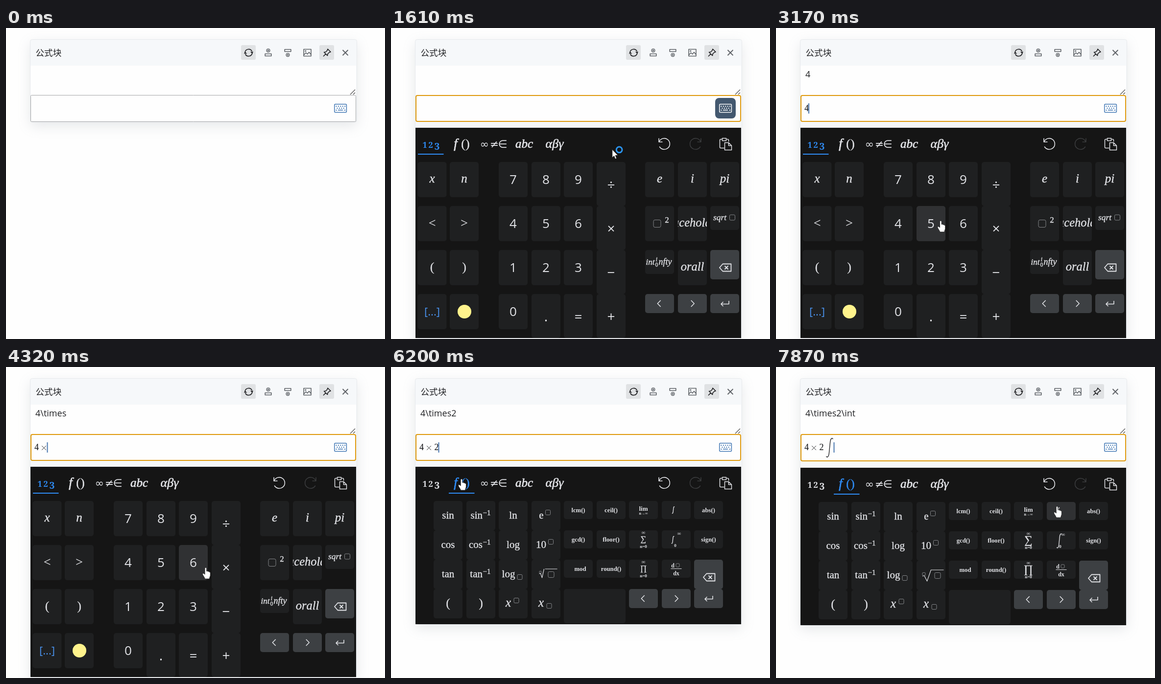
Recreate the animation shown at these times as an HTML page with a canvas. Size 774x636 px, loop 8000 ms.

```html
<!DOCTYPE html>
<html lang="zh">
<head>
<meta charset="utf-8">
<title>公式块</title>
<style>
  html, body { margin: 0; width: 100%; height: 100%; overflow: hidden; background: #fefefe; }
  canvas { display: block; }
</style>
</head>
<body>
<canvas id="stage" width="774" height="636"></canvas>
<script>
const ctx = document.getElementById('stage').getContext('2d');
const LOOP = 8000;
const PAGE = '#fefefe', PANEL = '#f6f8fa', DARK = '#151515', KEY = '#1f2021', HOVER = '#303133', ACTION = '#3d4043';
const LIGHT = '#e3e4e8', BLUE = '#2f8cf5', INK = '#202124', GREY = '#5f6368';
const SANS = '"Open Sans", "Noto Sans", sans-serif';
const SERIF = '"Liberation Serif", serif';

// ---------- timeline ----------
const EDITS = [1080, 2960, 3990, 5130, 7680];
const SOURCES = ['', '4', '4\\times', '4\\times2', '4\\times2\\int'];
const CARET_X = [57, 66, 83.5, 96.5, 117.5];
const KEYBOARD_OPEN = 1470, FUNCTIONS_OPEN = 6130, LARGE_SYMBOLS = 6320;
const HOVERS = [
  [2500, 3040, '4'], [3080, 3300, '5'], [3300, 3460, '6'], [3920, 4200, '×'],
  [4200, 4440, '6'], [4730, 5200, '2'], [7680, 8000, '∫']
];
// time, x, y, pointing hand
const POINTER = [
  [190, 772, 634, 0], [560, 738, 390, 0], [870, 686, 172, 1], [940, 682, 162, 1], [1400, 682, 162, 0],
  [1610, 453, 248, 0], [1810, 207, 331, 0], [2020, 207, 331, 0], [2150, 204, 326, 0], [2290, 204, 326, 0],
  [2430, 299, 353, 0], [2560, 276, 376, 1], [2700, 262, 395, 1], [2960, 262, 395, 1], [3170, 336, 394, 1],
  [3400, 410, 440, 1], [3650, 448, 479, 1], [3780, 429, 403, 1], [4130, 429, 403, 1], [4320, 408, 410, 1],
  [4660, 348, 487, 1], [4990, 325, 487, 1], [5130, 325, 487, 0], [5250, 506, 443, 0], [5390, 556, 400, 0],
  [5630, 335, 305, 0], [5870, 121, 224, 0], [5990, 113, 221, 0], [6130, 144, 229, 1], [6530, 144, 229, 0],
  [6800, 330, 262, 0], [7140, 569, 290, 0], [7280, 557, 288, 0], [7410, 557, 288, 0], [7470, 574, 285, 1],
  [8000, 574, 285, 1]
];

// Zero speed where the pointer rests, otherwise the mean speed of the neighbours.
function speed(i, axis) {
  const a = POINTER[i - 1], b = POINTER[i], c = POINTER[i + 1];
  const still = (p, q) => p[1] === q[1] && p[2] === q[2];
  if (!a || !c || still(a, b) || still(b, c)) return 0;
  return (c[axis] - a[axis]) / (c[0] - a[0]);
}

function pointerAt(t) {
  const i = POINTER.findLastIndex(p => p[0] <= t);
  if (i < 0) return null;
  const a = POINTER[i], b = POINTER[i + 1], span = b[0] - a[0], u = (t - a[0]) / span;
  const along = axis =>
    a[axis] * (1 + 2 * u) * (1 - u) ** 2 + b[axis] * u * u * (3 - 2 * u) +
    span * (speed(i, axis) * u * (1 - u) ** 2 - speed(i + 1, axis) * u * u * (1 - u));
  return { x: along(1), y: along(2), hand: a[3] };
}

// ---------- drawing helpers ----------
function text(s, x, y, font, color = LIGHT, align = 'center', weight = 0) {
  ctx.font = font;
  ctx.textAlign = align;
  ctx.fillStyle = ctx.strokeStyle = color;
  ctx.fillText(s, x, y);
  if (weight) { ctx.lineWidth = weight; ctx.strokeText(s, x, y); }
}
const serif = (s, x, y, size, { style = '', color = LIGHT, align = 'center', weight = 0.35 } = {}) =>
  text(s, x, y, `${style} ${size}px ${SERIF}`, color, align, weight);
const italic = (s, x, y, size, options) => serif(s, x, y, size, { style: 'italic', ...options });
const bold = (s, x, y, size) => serif(s, x, y, size, { style: 'bold', weight: 0 });

function rounded(x, y, w, h, r, fill, stroke, width = 1) {
  ctx.beginPath();
  ctx.roundRect(x, y, w, h, r);
  if (fill) { ctx.fillStyle = fill; ctx.fill(); }
  if (stroke) { ctx.strokeStyle = stroke; ctx.lineWidth = width; ctx.stroke(); }
}

function icon(d, x, y, { stroke = LIGHT, fill, width = 1.6, scale = 1, flip = 1 } = {}) {
  const path = new Path2D(d);
  ctx.save();
  ctx.translate(x, y);
  ctx.scale(scale * flip, scale);
  ctx.lineWidth = width / scale;
  ctx.lineJoin = 'round';
  if (fill) { ctx.fillStyle = fill; ctx.fill(path); }
  if (stroke) { ctx.strokeStyle = stroke; ctx.stroke(path); }
  ctx.restore();
}

function disc(x, y, r, color) {
  ctx.beginPath();
  ctx.arc(x, y, r, 0, 7);
  ctx.fillStyle = color;
  ctx.fill();
}

const slot = (x, y, size = 10) => rounded(x + 0.5, y + 0.5, size, size, size / 5, null, '#85878a', 1);
const integral = (x, y, height, color = LIGHT) =>
  icon('M6.8-17.5C5.5-20.5 2.5-20 1.2-12L-1.2 12C-2.5 20-5.5 20.5-6.8 17.5', x, y,
    { stroke: color, width: 1.4, scale: height / 40 });

// ---------- key labels ----------
const digit = (s, x, y) => text(s, x, y + 9.4, `26px ${SANS}`);
const operator = (s, x, y) => text(s, x, y + 10.5, `28px ${SANS}`);
const variable = (s, x, y) => italic(s, x, y + 5.5, 25);
const symbol = (s, x, y) => serif(s, x, y + 7, 26, { weight: 0.2 });
const named = (s, x, y) => serif(s, x, y + 6, 21);
const small = (s, x, y) => bold(s, s === 'mod' ? x + 4 : x, y + 4, 12.7);
const left = (s, x, y) => icon('M3.2-6.5L-3.2 0L3.2 6.5', x - 1, y);
const right = (s, x, y) => icon('M-3.2-6.5L3.2 0L-3.2 6.5', x + 0.5, y);
const enter = (s, x, y) => icon('M8.5-5.5V1H-7.5M-3-3.5L-7.5 1L-3 5.5', x, y);
const erase = (s, x, y) =>
  icon('M-5.5-7.5H11.5V7.5H-5.5L-12 0ZM-1.5-3.5L5.5 3.5M5.5-3.5L-1.5 3.5', x + 1.5, y + 6, { width: 1.8 });

function inverse(s, x, y) {
  serif(s, x + 3.5, y + 6, 21, { align: 'right' });
  serif('−1', x + 4, y - 1, 15, { align: 'left' });
}
function withSlot(draw, baseX, slotX, slotY) {
  return (s, x, y) => { draw(s, x + baseX, y); slot(x + slotX, y + slotY); };
}
function square(s, x, y) {
  slot(x - 13, y - 8, 15);
  serif('2', x + 15, y - 2, 17);
}
function infinityIntegral(s, x, y) {
  italic('int', x - 28, y + 5, 17, { align: 'left' });
  italic('i', x - 6, y - 2, 12);
  serif('0', x - 6, y + 9, 12);
  italic('nfty', x - 2, y + 5, 18, { align: 'left' });
}
function squareRoot(s, x, y) {
  italic('sqrt', x - 10, y + 4, 17.5);
  slot(x + 9.5, y - 7, 11);
}
function nthRoot(s, x, y, large) {
  const d = large ? 'M-17 2L-14 0L-8 12L0-11H26' : 'M-14-1L-11-2L-8 7L-4-11M-2-11H23';
  icon(d, x, y, { width: 1.2 });
  if (large) slot(x - 18, y - 6, 6); else slot(x - 14, y - 7, 4);
  slot(x + 4 + 3 * large, y - 6, 12);
}
function limit(s, x, y) {
  bold('lim', x, y + 1, 13);
  bold('n→∞', x, y + 9, 8);
}
function bigOperator(s, x, y, large) {
  bold('∞', x, y - 11, 11);
  const size = large ? 23 : 16;
  serif(s, x, y + size * 0.28, size);
  bold('n=0', x, y + 17, 9);
}
function definite(s, x, y, large) {
  integral(x - (large ? 4 : 7), y + 1, large ? 30 : 15);
  bold('∞', x + (large ? 4 : 6), y - 9, 11);
  bold('0', x - 2, y + 15, 9);
}
function derivative(s, x, y) {
  bold('d', x - 7, y - 3, 12);
  slot(x - 1, y - 11, 7);
  icon('M-11 0H11', x, y, { width: 1 });
  bold('dx', x, y + 13, 12);
}

// ---------- key layouts ----------
const column = (col, row, labels, h, draw, extra) =>
  Array.from(labels, (label, i) => ({ col, row: row + i, h, label, draw, fill: KEY, w: 59, ...extra }));
const action = { fill: ACTION };

const NUMBERS = {
  x: [54.5, 120, 220, 287, 353, 420, 519, 586, 652], pitch: 90, bottom: 634, underline: 55,
  keys: [
    column(0, 0, 'x', 72, variable), column(0, 1, '<(', 72, symbol),
    column(0, 3, ['[...]'], 72, (s, x, y) => text(s, x, y + 8, `22px ${SANS}`, '#4a93f0')),
    column(1, 0, 'n', 72, variable), column(1, 1, '>)', 72, symbol),
    column(1, 3, ['dot'], 72, (s, x, y) => disc(x + 0.5, y, 14, '#fff38c')),
    column(2, 0, '7410', 72, digit), column(3, 0, '852', 72, digit), column(3, 3, '.', 90, operator),
    column(4, 0, '963', 72, digit), column(4, 3, '=', 90, operator), column(5, 0, '÷×−+', 90, operator),
    column(6, 0, 'e', 72, variable), column(6, 1, ['square'], 72, square),
    column(6, 2, ['int'], 49, infinityIntegral), column(6, 3, ['left'], 39, left, action),
    column(7, 0, 'i', 72, variable), column(7, 1, ['placeholder', 'orall'], 72, (s, x, y) => italic(s, x, y + 6, 24.5)),
    column(7, 3, ['right'], 39, right, action),
    column(8, 0, ['pi'], 72, variable), column(8, 1, ['sqrt'], 49, squareRoot),
    column(8, 2, ['erase'], 60, erase, action), column(8, 3, ['enter'], 39, enter, action)
  ].flat()
};

const FUNCTIONS = {
  x: [87, 154, 220, 287, 353, 420, 486, 553, 619], pitch: 60, bottom: 526, underline: 118,
  keys: [
    column(0, 0, ['sin', 'cos', 'tan'], 60, named), column(0, 3, '(', 60, symbol),
    column(1, 0, ['sin', 'cos', 'tan'], 60, inverse), column(1, 3, ')', 60, symbol),
    column(2, 0, ['ln', 'log'], 60, named), column(2, 2, ['log'], 60, withSlot(named, -9.5, 8, 0)),
    column(2, 3, 'x', 60, withSlot(variable, -10, 1, -12)),
    column(3, 0, 'e', 60, withSlot(named, -9.5, -1.5, -12)), column(3, 1, ['10'], 60, withSlot(named, -10, 4.5, -12)),
    column(3, 2, ['root'], 60, nthRoot), column(3, 3, 'x', 60, withSlot(variable, -10, 1, -1)),
    column(4, 0, ['lcm()', 'gcd()', 'mod'], 37, small), column(4, 3, [''], 70, () => {}, { w: 126 }),
    column(5, 0, ['ceil()', 'floor()', 'round()'], 37, small),
    column(6, 0, ['lim'], 37, limit), column(6, 1, '∑∏', 37, bigOperator), column(6, 3, ['left'], 39, left, action),
    column(7, 0, '∫', 37, (s, x, y) => integral(x - 6, y, 14)), column(7, 1, ['definite'], 37, definite),
    column(7, 2, ['d/dx'], 37, derivative), column(7, 3, ['right'], 39, right, action),
    column(8, 0, ['abs()', 'sign()'], 37, small),
    column(8, 2, ['erase'], 60, erase, action), column(8, 3, ['enter'], 39, enter, action)
  ].flat()
};

// ---------- scene ----------
function drawPanel(bottom) {
  ctx.save();
  ctx.shadowColor = 'rgba(140, 149, 159, 0.22)';
  ctx.shadowBlur = 26;
  ctx.shadowOffsetY = 8;
  rounded(50, 24, 666, bottom - 24, 4, PANEL);
  ctx.restore();
  rounded(49.5, 23.5, 667, bottom - 23, 4, null, '#e6e9ec');
  ctx.fillStyle = PAGE;
  ctx.fillRect(50, 77, 665, 60);
  text('公式块', 60.5, 57, '17.6px "Noto Sans CJK SC", "Noto Sans CJK", sans-serif', INK, 'left');

  const dark = { stroke: INK, width: 1.7 }, grey = { stroke: GREY, width: 1.6 };
  rounded(480, 35, 30, 30, 3, '#e0e2e4');
  rounded(640, 35, 30, 30, 3, '#e0e2e4');
  icon('M-7.4-1A7.6 7.6 0 0 1 6.8-3M7.4 1A7.6 7.6 0 0 1-6.8 3', 495.5, 50.5, dark);
  icon('M3.2-2H9.5L7.5 2.2ZM-3.2 2H-9.5L-7.5-2.2Z', 495.5, 50.5, { stroke: null, fill: INK });
  for (const [x, side] of [[535.5, 1], [575.5, -1]]) {
    icon('M-6.3 2.2H6.3V6.8H-6.3Z', x, 50.5 - (side < 0 ? 9 : 0), grey);
    icon('M-3.4 0A3.4 3.4 0 1 0 3.4 0A3.4 3.4 0 1 0-3.4 0M-2 0H2M0-2V2', x, 50.5 - 4.5 * side, { stroke: GREY, width: 1.4 });
  }
  icon('M-7.5-7H7.5V7H-7.5ZM-7.5 5L-3 0L0 3L3.5-1L7.5 4', 615.5, 50.5, grey);
  disc(611.8, 47, 1.6, GREY);
  icon('M1.5-7.5L7.5-1.5L4.5-.5L1.5 2.5L1 6L-6-1L-2.5-1.5L.5-4.5ZM-2.5 2.5L-7.5 7.5', 655.5, 50.5, dark);
  icon('M-5.5-5.5L5.5 5.5M5.5-5.5L-5.5 5.5', 693, 50.5, { stroke: GREY, width: 2 });
  icon('M-5 5L5-5M1 5L5 1', 708, 131, { stroke: '#555', width: 1.3 });
}

function drawToggle(hovered) {
  if (hovered) rounded(662, 143, 42, 42, 8, '#43586f');
  const color = hovered ? '#fff' : '#3f76b3';
  rounded(670.8, 155.8, 24.6, 16.6, 2, null, color, 1.5);
  ctx.fillStyle = color;
  for (let i = 0; i < 5; i++) ctx.fillRect(673.5 + i * 4.4, 159, 2, 2);
  for (let i = 0; i < 4; i++) ctx.fillRect(675.5 + i * 4.4, 163, 2, 2);
  ctx.fillRect(673.5, 167, 2, 2);
  ctx.fillRect(678, 167, 10, 1.6);
  ctx.fillRect(691, 167, 2, 2);
}

function drawField(t, count, focused) {
  const grow = count === 4 ? 1 : 0;
  if (focused) rounded(51, 138, 663, 53 + grow, 3, PAGE, '#df9a0d', 2);
  else rounded(50.5, 137.5, 664, 54, 2, PAGE, '#a5a6a8');
  drawToggle(t >= 870 && t < 1700);

  text(SOURCES[count], 60, 101, `18px ${SANS}`, INK, 'left');
  const ink = { color: INK, weight: 0.15 };
  if (count > 0) serif('4', 62.5, 170, 18, ink);
  if (count > 1) icon('M-4.3-4.3L4.3 4.3M4.3-4.3L-4.3 4.3', 77.5, 165.5, { stroke: INK, width: 1 });
  if (count > 2) serif('2', 93, 170, 18, ink);
  if (count > 3) integral(109.5, 165, 40, INK);
  if (focused && (t - EDITS[count]) % 1050 < 525) {
    ctx.fillStyle = '#4b78af';
    ctx.fillRect(CARET_X[count], 154, 2, 21);
  }
}

function drawTabs(layout) {
  const shade = tab => ({ color: tab === layout ? BLUE : LIGHT });
  const old = (s, x, y, size) => text(s, x, y, `bold ${size}px "Noto Serif", serif`, shade(NUMBERS).color);
  old('1', 69, 245, 16.5);
  old('2', 81, 245, 16.5);
  old('3', 94, 249, 19);
  italic('f', 132, 245, 27, { ...shade(FUNCTIONS), weight: 0.7 });
  serif('()', 152, 245, 26, shade(FUNCTIONS));
  for (const [s, x] of [['∞', 191], ['≠', 211], ['∈', 228]]) text(s, x, 245, '22px "DejaVu Sans", sans-serif');
  italic('abc', 272, 245, 25, { weight: 0.7 });
  italic('αβγ', 334, 245, 26, { weight: 0.6 });
  ctx.fillStyle = BLUE;
  ctx.fillRect(layout.underline, 257, 52.5, 2);

  const undo = 'M-11.5-12V-4.5H-4M-10.8-5A11.3 11.3 0 1 1-10.3 5';
  icon(undo, 558.5, 237.5);
  icon(undo, 621.5, 237.5, { stroke: '#3a3b3d', flip: -1 });
  icon('M-3 8H-10Q-12 8-12 6V-8Q-12-10-10-10H-8M2-10H4Q6-10 6-8V-5' +
    'M-7-12H1V-7H-7ZM-2-3H6L12 3V12H-2ZM6-3V3H12', 683.5, 237.5, { width: 1.5 });
}

function drawKeyboard(t, layout, shift) {
  ctx.save();
  ctx.translate(0, shift);
  ctx.fillStyle = DARK;
  ctx.fillRect(50, 204, 665, layout.bottom - 204);
  drawTabs(layout);
  const hovered = HOVERS.find(([from, to]) => t >= from && t < to)?.[2];
  for (const { col, row, w, h, label, draw, fill } of layout.keys) {
    const x = layout.x[col], y = 274 + row * layout.pitch;
    ctx.save();
    rounded(x, y, w, h, 5, label === hovered ? HOVER : fill);
    if (label === 'placeholder' || label === 'int') ctx.clip();
    draw(label, x + w / 2, y + h / 2, t >= LARGE_SYMBOLS);
    ctx.restore();
  }
  ctx.restore();
}

function drawPointer({ x, y, hand }) {
  const style = { fill: '#fff', stroke: '#222', width: 0.9 };
  if (hand) {
    icon('M-1.8 2C-1.8-.6 1.8-.6 1.8 2V7.5C3 6.5 4.6 7 4.8 8.3C6 7.5 7.2 8 7.4 9.2C8.6 8.8 9.4 9.6 9.4 11' +
      'V15.5C9.4 18 8 19 7.6 23H-1.6C-2 20-6 16-6.4 13.4C-6.2 11-4 11.3-1.8 14Z', x, y, style);
    return;
  }
  icon('M0 0V16.5L3.7 13.2L6.2 19.3L8.8 18.2L6.4 12.2L11.5 11.8Z', x, y, style);
  ctx.beginPath();
  ctx.arc(x + 14.3, y + 0.5, 5.9, 0, 7);
  ctx.lineWidth = 3;
  ctx.strokeStyle = '#2b94ee';
  ctx.stroke();
}

function draw(t) {
  const open = t >= KEYBOARD_OPEN, layout = t >= FUNCTIONS_OPEN ? FUNCTIONS : NUMBERS;
  const last = EDITS.findLastIndex(time => time <= t), count = Math.max(0, last);
  const shift = count === 4 ? 2 : 0;
  ctx.fillStyle = PAGE;
  ctx.fillRect(0, 0, 774, 636);
  drawPanel(open ? layout.bottom + shift : 192);
  drawField(t, count, last >= 0);
  if (open) drawKeyboard(t, layout, shift);
  const pointer = pointerAt(t);
  if (pointer) drawPointer(pointer);
}

const start = performance.now();
function tick() {
  draw((performance.now() - start) % LOOP);
  requestAnimationFrame(tick);
}
tick();
</script>
</body>
</html>
```
